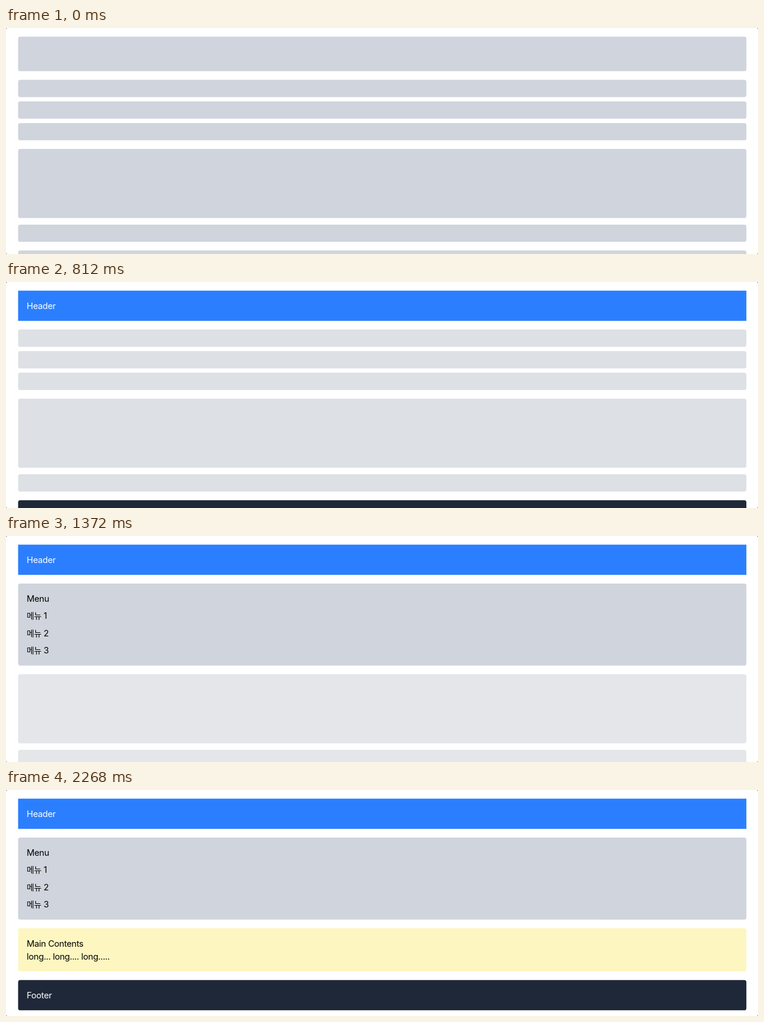
Animation of 1280 by 385 pixels, one loop 2.66 s. Source, as an HTML page:

```html
<!DOCTYPE html>
<html lang="ko">
<head>
<meta charset="utf-8">
<style>
  html, body { margin: 0; width: 100%; height: 100%; overflow: hidden; background: #555; }
  svg { display: block; width: 1280px; height: 385px; }
  text { font: 16px Inter, "Noto Sans CJK KR", sans-serif; letter-spacing: -.35px; white-space: pre; }
  .ko { font-size: 15px; }
</style>
</head>
<body>
<svg viewBox="0 0 1280 385">
  <rect width="1280" height="385" rx="2.5" fill="#fff"/>
  <g id="page" transform="scale(.92)"></g>
</svg>
<script>
const LOOP = 2660;
const page = document.getElementById('page');

// Skeleton tint of the pulse, from the given time on
const pulse = [[0, '#d0d4dc'], [140, '#d6dade'], [350, '#dde0e4'], [1120, '#e5e6ea'], [1540, '#d5d8dd']];

const box = (y, h, fill, r = 4) =>
  `<rect x="22.4" y="${y}" width="1347.4" height="${h}" rx="${r}" fill="${fill}"/>`;

const line = (mid, str, fill = '#000') =>
  `<text x="38.4" y="${mid + 5.7}" fill="${fill}">${str.replace('메뉴', '<tspan class="ko">메뉴</tspan>')}</text>`;

// Each section returns its height and markup at top y
const section = (h, gap, draw) => ({ h, gap, draw });

function layout(t) {
  const tint = pulse.filter(p => p[0] <= t).pop()[1];
  const bone = (h, gap) => section(h, gap, y => box(y, h, tint));

  const header = t < 140 ? [bone(64, 16)]
    : [section(56, 16, y => box(y, 56, '#2b7fff', 0) + line(y + 28, 'Header', '#fff'))];

  const menu = t < 1120 ? [bone(32, 8), bone(32, 8), bone(32, 16)]
    : [section(152, 16, y => box(y, 152, '#d0d4dc') +
        ['Menu', '메뉴 1', '메뉴 2', '메뉴 3'].map((s, i) => line(y + 28 + i * 32, s)).join(''))];

  const main = t < 1680 ? [bone(128, 12), bone(32, 16)]
    : [section(80, 16, y => box(y, 80, '#fdf6c0') +
        line(y + 28, 'Main Contents') + line(y + 52, 'long... long.... long.....'))];

  const footer = t < 350 ? [bone(56, 0)]
    : [section(56, 0, y => box(y, 56, '#1f2838') + line(y + 28, 'Footer', '#fff'))];

  return [...header, ...menu, ...main, ...footer];
}

function render(t) {
  let y = 16;
  return layout(t).map(s => {
    const out = s.draw(y);
    y += s.h + s.gap;
    return out;
  }).join('');
}

let shown = '';
const start = performance.now();
function tick() {
  const markup = render((performance.now() - start) % LOOP);
  if (markup !== shown) page.innerHTML = shown = markup;
  requestAnimationFrame(tick);
}
tick();
</script>
</body>
</html>
```
